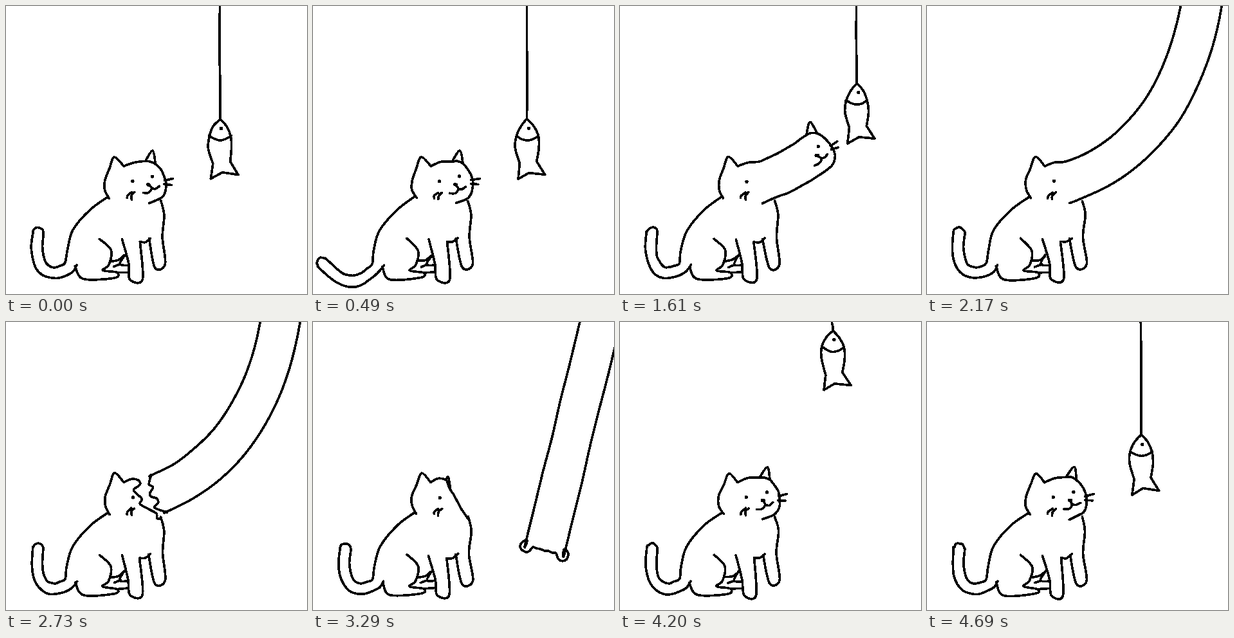
An HTML page for the animation above (4760 ms loop, 468 px wide and 448 px high).

```html
<!DOCTYPE html>
<html lang="en">
<head>
<meta charset="utf-8">
<title>Cat and fish</title>
<style>
html, body { margin: 0; width: 100%; height: 100%; overflow: hidden; background: #fff; }
svg { display: block; width: 468px; height: 448px; }
path { fill: none; stroke: #000; stroke-linecap: round; stroke-linejoin: round; shape-rendering: crispEdges; }
</style>
</head>
<body>
<svg viewBox="0 0 468 448"><path id="ink" stroke-width="3.7"/><path id="dots" stroke-width="5.4"/></svg>
<script>
const LOOP = 4760, STEP = 70, PI = Math.PI;
const ink = document.getElementById('ink'), dots = document.getElementById('dots');

const pts = s => s.trim().split(/\s+/).map(p => p.split(',').map(Number));
const lines = s => s.split('|').map(pts);
const mix = (a, b, k) => a + (b - a) * k;
const mixPt = (p, q, k) => p.map((v, i) => mix(v, q[i], k));
const morph = (a, b, k) => a.map((p, i) => mixPt(p, b[i], k));
const shift = (line, [x, y]) => line.map(p => [p[0] + x, p[1] + y]);
const ramp = (t, a, b) => Math.min(1, Math.max(0, (t - a) / (b - a)));
const smooth = k => k * k * (3 - 2 * k);
const span = (n, f) => Array.from({ length: n + 1 }, (_, i) => f(i / n));

// Strokes of the seated body, then of the right half of the face
const BODY = lines(`161,299 154,286 154,271 161,253 169,235 183,249 |
  200,290 195,295 195,301 | 195,290 189,295 188,299 |
  241,303 246,325 243,360 248,402 232,407 222,362 |
  180,363 190,400 193,425 212,425 208,367 | 208,367 217,367 225,361 |
  146,362 163,380 160,402 150,411 172,415 168,423 120,425 108,405 |
  163,397 175,395 183,389 | 184,388 177,402 190,403 | 168,406 178,402 | 172,415 190,414`);
const FACE = lines(`221,277 226,284 221,291 213,291 | 226,284 232,285 238,281 |
  246,271 259,268 | 246,277 257,278`);
const FACE_DOTS = pts('228,265 221,277 223,278');
const FISH_SIDE = pts('0,0 10,11 17,27 18,45 15,66');
const FISH_TAIL = pts('-14,93 3,83 28,86');

// Cubic spines of the tail, the stretched neck and the loose neck
const TAIL = pts('50,353 40,420 75,425 101,404');
const NECK = pts('227,271 318,238 402,155 428,-10');
const LOOSE = pts('356,371 388,240 420,110 450,-15');
const NECK_W = 31, CUT = .04, FAR = 1.2;

// Point beside a spine: s along it, then offsets across and ahead
function beside([a, b, c, d], s, across, ahead = 0) {
  const r = 1 - s;
  const at = i => r * r * r * a[i] + 3 * r * r * s * b[i] + 3 * r * s * s * c[i] + s * s * s * d[i];
  const slope = i => r * r * (b[i] - a[i]) + 2 * r * s * (c[i] - b[i]) + s * s * (d[i] - c[i]);
  const len = Math.hypot(slope(0), slope(1)), tx = slope(0) / len, ty = slope(1) / len;
  return [at(0) + tx * ahead - ty * across, at(1) + ty * ahead + tx * across];
}
const edge = (spine, from, to, across) => span(8, k => beside(spine, mix(from, to, k), across));
const cap = (spine, s, w, depth) =>
  span(8, k => beside(spine, s, -w * Math.cos(PI * k), depth * Math.sin(PI * k)));
const jag = k => 5 * Math.sin(k * 17);

let step = 0, inkPath = '', dotPath = '';
const text = v => v.map(n => n.toFixed(1)).join(' ');

// Hand-drawn wobble; equal points stay joined
function wobble([x, y]) {
  const n = Math.sin(x * 12.9 + y * 78.2 + step * 37.7) * 437;
  return [x + Math.sin(n) * .6, y + Math.cos(n * 1.7) * .6];
}

function draw(line) {
  const p = line.map(wobble), at = i => p[Math.min(p.length - 1, Math.max(0, i))];
  inkPath += 'M' + text(p[0]);
  for (let i = 0; i < p.length - 1; i++) {
    const a = at(i - 1), b = at(i), c = at(i + 1), d = at(i + 2);
    inkPath += 'C' + text([b[0] + (c[0] - a[0]) / 6, b[1] + (c[1] - a[1]) / 6,
      c[0] - (d[0] - b[0]) / 6, c[1] - (d[1] - b[1]) / 6, ...c]);
  }
}

function dot(p) {
  dotPath += 'M' + text(wobble(p)) + 'h.01';
}

function drawBackAndTail(t) {
  const a = t < 1120 ? -.95 * Math.sin(PI * t / 1120) ** 2 : 0;
  const spine = TAIL.map(([x, y], i) => {
    const dx = x - 80, dy = y - 412;
    return i > 1 ? [x, y] : [80 + dx * Math.cos(a) - dy * Math.sin(a), 412 + dx * Math.sin(a) + dy * Math.cos(a)];
  });
  draw([[158, 297], [130, 317], [104, 349], [95, 380], ...edge(spine, .95, 0, -8.5),
    ...cap(spine, 0, 8.5, -8.5), ...edge(spine, 0, .97, 8.5), [110, 403]]);
}

function lure(t) {
  if (t < 3000) {
    const k = ramp(t, 1330, 1960);
    return [333 + 79 * k, 176 - 420 * k ** 2.5];
  }
  const left = 1 - ramp(t, 4030, 4620);
  return [333 - 3 * left, 176 - 276 * left ** 1.55];
}

function drawFish(t) {
  const [x, y] = lure(t);
  if (y <= -100) return;
  const left = FISH_SIDE.map(([a, b]) => [-a, b]);
  left[4] = [-11, 69];
  const [l, m, r] = FISH_TAIL, gill = span(4, k => [34 * k - 17, 26 + 7 * Math.sin(PI * k)]);
  [left, FISH_SIDE, [left[4], l], [l, m], [m, r], [r, FISH_SIDE[4]], gill]
    .forEach(s => draw(shift(s, [x, y])));
  dot([x + 2, y + 14]);
  if (y > 0) draw(span(3, k => [x - 1 + k, mix(-3, y, k)]));
}

// Carries a point of the resting head along the neck
function carry([x, y], u) {
  const o = NECK[0], f = beside(NECK, 0, 0, 1);
  const dx = x - o[0], dy = y - o[1], tx = f[0] - o[0], ty = f[1] - o[1];
  return beside(NECK, u, dy * tx - dx * ty, dx * tx + dy * ty);
}

function drawFace(u) {
  FACE.forEach(l => draw(l.map(p => carry(p, u))));
  FACE_DOTS.forEach(p => dot(carry(p, u)));
}

const earTip = u => beside(NECK, u, -42, 17);

function drawHead(u) {
  const front = cap(NECK, u, NECK_W, 20);
  const top = u ? edge(NECK, 0, u, -NECK_W).slice(0, -1) : [];
  const low = u ? edge(NECK, u, 0, NECK_W).slice(1) : [];
  draw([[183, 249], [199, 243], ...top, ...front, ...low, [222, 307]]);
  draw([front[0], earTip(u), front[2]]);
  drawFace(u);
}

const stump = heal => span(8, k =>
  [mix(206, 240, k) + (1 - heal) * (jag(k) - 16 * Math.sin(PI * k)), mix(246, 306, k)]);

function drawStump(heal, grow) {
  const front = morph(stump(heal), cap(NECK, 0, NECK_W, 20), grow);
  draw([[183, 249], [195, 244], ...front, mixPt([240, 306], [222, 307], grow)]);
  if (heal > .6) draw([front[0], mixPt([211, 241], earTip(0), grow), front[2]]);
  if (grow > .8) drawFace(0);
}

// Loose neck: ragged at first, then closing into two knobs
function drawLoose(swing, heal, move) {
  const spine = morph(NECK, LOOSE, swing), r = 9 * heal;
  const knob = side => span(5, k => {
    const a = PI * mix(1.5, .25, k);
    return beside(spine, CUT, side * (NECK_W - 2 * heal - r * Math.cos(a)), -r * Math.sin(a));
  });
  const middle = span(6, k => mix(.2, .8, k)).map(k =>
    beside(spine, CUT, (2 * k - 1) * NECK_W, (heal - 1) * (10 + jag(k))));
  draw(shift([...edge(spine, FAR, CUT, -NECK_W), ...knob(-1), ...middle,
    ...knob(1).reverse(), ...edge(spine, CUT, FAR, NECK_W)], move));
}

function render(t) {
  inkPath = dotPath = '';
  BODY.forEach(draw);
  drawBackAndTail(t);
  dot([197, 273]);
  drawFish(t);
  if (t < 2660) {
    drawHead(1.15 * ramp(t, 1400, 2170));
    const torn = Math.ceil(8 * ramp(t, 2500, 2650));
    if (torn) draw(stump(0).slice(0, torn + 1));
  } else if (t < 3970) {
    drawStump(smooth(ramp(t, 2800, 3220)), smooth(ramp(t, 3360, 3850)));
    const rise = ramp(t, 3360, 3970) ** 1.5;
    drawLoose(smooth(ramp(t, 2730, 3260)), smooth(ramp(t, 2800, 3260)), [95 * rise, -400 * rise]);
  } else drawHead(0);
  ink.setAttribute('d', inkPath);
  dots.setAttribute('d', dotPath);
}

const start = performance.now();
let shown = -1;
function tick() {
  step = Math.floor(((performance.now() - start) % LOOP) / STEP);
  if (step !== shown) render((shown = step) * STEP);
  requestAnimationFrame(tick);
}
tick();
</script>
</body>
</html>
```
